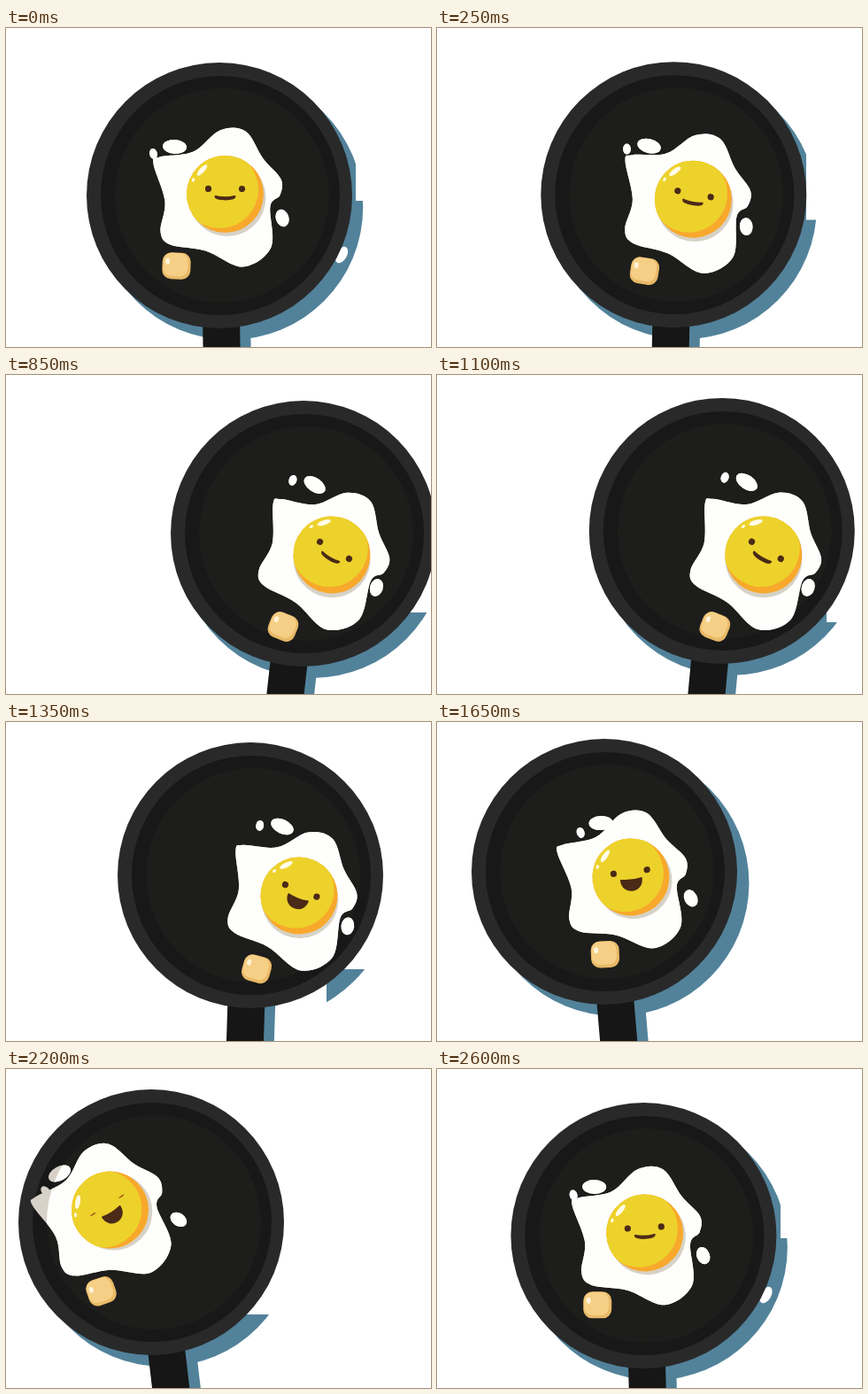
These frames come from a looping animation (480 px wide and 360 px high, 2650 ms). An HTML page with a canvas:

```html
<!DOCTYPE html>
<html>
<head>
<meta charset="utf-8">
<style>
html, body { margin: 0; width: 100%; height: 100%; overflow: hidden; background: #fff; }
canvas { display: block; }
</style>
</head>
<body>
<canvas id="stage" width="480" height="360"></canvas>
<script>
const ctx = document.getElementById('stage').getContext('2d');
const LOOP = 2650, STEP = 50;

// Only the pan and the yolk are keyed; everything else follows them
const keys = [
  { t: 0,    pan: [241, 189], yolk: [247.5, 187.5] },
  { t: 500,  pan: [291, 184], yolk: [321, 196] },
  { t: 850,  pan: [336, 179], yolk: [368, 203] },
  { t: 1350, pan: [276, 173], yolk: [331, 196] },
  { t: 1650, pan: [189, 169], yolk: [219, 175] },
  { t: 1950, pan: [150, 169], yolk: [127, 161] },
  { t: 2200, pan: [164, 173], yolk: [117.5, 159] }
];

// Two shoulders and a valley for each of the five lobes
const eggOutline = [
  [-81, -34], [-74, -42], [-36, -48],
  [-6, -72], [23, -71], [43, -40],
  [63, -17], [62, 1], [51, 14],
  [52, 60], [20, 82], [-22, 64],
  [-62, 57], [-73, 42], [-68, 8]
];

const rad = deg => deg * Math.PI / 180;
const cyclic = (list, i) => list[(i + list.length) % list.length];

function ramp(t, from, to) {
  const u = Math.max(0, Math.min(1, (t - from) / (to - from)));
  return u * u * (3 - 2 * u);
}
const pulse = (t, rise, top, fall, end) => ramp(t, rise, top) * (1 - ramp(t, fall, end));

// Periodic cubic interpolation through the keys
function sample(part, axis, t) {
  const value = i => cyclic(keys, i)[part][axis];
  const gap = i => (cyclic(keys, i + 1).t - cyclic(keys, i).t + LOOP) % LOOP;
  const rate = i => (value(i + 1) - value(i)) / gap(i);
  const slope = i => (rate(i - 1) * gap(i) + rate(i) * gap(i - 1)) / (gap(i - 1) + gap(i));
  const i = keys.findLastIndex(k => k.t <= t);
  const h = gap(i), u = (t - keys[i].t) / h, v = 1 - u;
  return v * v * (1 + 2 * u) * value(i) + u * u * (3 - 2 * u) * value(i + 1)
    + h * u * v * (v * slope(i) - u * slope(i + 1));
}

function poseAt(t) {
  const [px, py, x, y] = ['pan', 'yolk'].flatMap(part => [0, 1].map(axis => sample(part, axis, t)));
  const face = (x - 247) / 4;
  const beadAngle = rad(22.6 + 0.45 * face), beadReach = 70 - 0.25 * face;
  const butterLag = 45 * pulse(t, 1100, 2100, 2200, LOOP);
  return {
    pan: { x: px, y: py, tilt: (px - 252) / 13 },
    yolk: { x, y }, face,
    drop: { x: x - 57 + 38 * pulse(t, 0, 900, 1350, 2050), y: py - 55 },
    bead: { x: x + beadReach * Math.cos(beadAngle), y: y + beadReach * Math.sin(beadAngle) },
    butter: { x: x - 55 + butterLag, y: y + 81 + 0.24 * butterLag }
  };
}

function at({ x, y }, deg, draw) {
  ctx.save();
  ctx.translate(x, y);
  ctx.rotate(rad(deg));
  draw();
  ctx.restore();
}

function ellipse(x, y, rx, ry, color, deg = 0) {
  ctx.beginPath();
  ctx.ellipse(x, y, rx, ry, rad(deg), 0, 7);
  ctx.fillStyle = color;
  ctx.fill();
}
const disc = (x, y, r, color) => ellipse(x, y, r, r, color);

function box(x, y, w, h, r, color) {
  ctx.beginPath();
  ctx.roundRect(x, y, w, h, r);
  ctx.fillStyle = color;
  ctx.fill();
}

function smoothShape(points, color) {
  ctx.beginPath();
  ctx.moveTo(...points[0]);
  points.forEach(([ax, ay], i) => {
    const [px, py] = cyclic(points, i - 1), [bx, by] = cyclic(points, i + 1), [nx, ny] = cyclic(points, i + 2);
    ctx.bezierCurveTo(ax + (bx - px) / 6, ay + (by - py) / 6, bx - (nx - ax) / 6, by - (ny - ay) / 6, bx, by);
  });
  ctx.fillStyle = color;
  ctx.fill();
}

function clipped(addRegion, draw) {
  ctx.save();
  ctx.beginPath();
  addRegion();
  ctx.clip();
  draw();
  ctx.restore();
}

const drawHandle = (place, tilt, color) => at(place, tilt, () => box(-21, 120, 42, 200, 0, color));

// Parts of the shadow are hidden above a ledge that slides with the pan
function shadowRegion(t) {
  if (t >= 1500 && t < 1950) return ctx.rect(0, 0, 480, 360);
  if (t >= 1200 && t < 1500) return ctx.rect(362, 279, 118, 81);
  const back = Math.max(0, t - 2200);
  const ledge = t < 1200 ? Math.min(279, 195 + t * 0.086) : 277 - back * 0.215;
  const side = t < 1200 ? Math.min(440, 395 + t * 0.088) : 270 + back * 0.295;
  ctx.rect(0, ledge, 480, 360);
  ctx.rect(0, 0, side, ledge);
}

function drawShadow({ x, y, tilt }, t) {
  const blue = '#52829a', place = { x: x + 12 - tilt * 0.3, y: y + 13 };
  clipped(() => shadowRegion(t), () => disc(place.x, place.y, 150, blue));
  drawHandle(place, tilt, blue);
  if (t < 250 || t > 2400) ellipse(x + 138, y + 67, 6, 10, '#fff', 30);
}

function drawPan(pan) {
  drawHandle(pan, pan.tilt, '#161616');
  disc(pan.x, pan.y, 150, '#29292a');
  disc(pan.x + 1, pan.y, 135, '#181818');
  disc(pan.x + 3, pan.y, 121, '#1d1d1c');
}

function drawWhite({ yolk, drop, bead, face }, color) {
  at(yolk, face * 0.6, () => smoothShape(eggOutline, color));
  at(drop, face, () => {
    ellipse(0, 0, 13.5, 8, color, 4);
    ellipse(-24, 8, 4.4, 6, color, -12);
  });
  ellipse(bead.x, bead.y, 7.3, 10, color, face * 1.2 - 18);
}

function drawButter({ butter, face }) {
  at(butter, face * 0.65 + 2, () => {
    box(-16, -15, 32, 30, 10, '#e8b967');
    box(-15, -14.5, 28, 26, 9, '#f6cf86');
    ellipse(-10, -5, 2.5, 3.5, '#fff3d8');
  });
}

function drawMouth(open, ink) {
  const w = 11 + open * 0.5, top = 2.5, bottom = top + 4.5 + 12 * open;
  ctx.beginPath();
  ctx.moveTo(-w, top);
  ctx.quadraticCurveTo(0, top + 2.5, w, top);
  ctx.bezierCurveTo(w, bottom, -w, bottom, -w, top);
  ctx.closePath();
  ctx.fillStyle = ctx.strokeStyle = ink;
  ctx.lineWidth = 2;
  ctx.lineJoin = 'round';
  ctx.fill();
  ctx.stroke();
}

function drawYolk({ yolk, face }, t) {
  const open = pulse(t, 1050, 1400, 2250, 2500);
  const blink = pulse(t, 2000, 2150, 2250, 2400);
  const ink = '#4b2a17', shine = '#fffbe8';
  at(yolk, face, () => {
    disc(2.5, 4, 43.5, '#d6d2c6');
    disc(0, 0, 43.5, '#f8a82b');
    clipped(() => ctx.arc(0, 0, 43.5, 0, 7), () => disc(-6, -5, 43.5, '#edd22b'));
    ellipse(-26, -27, 8, 2.8, shine, -48);
    ellipse(-36, -16, 1.6, 2.4, shine, 25);
    for (const x of [-19, 19]) ellipse(x, -6, 3.6, 3.6 - 2.7 * blink, blink > 0.6 ? '#a8641c' : ink);
    drawMouth(open, ink);
  });
}

function render(now) {
  const t = Math.floor(now % LOOP / STEP) * STEP;
  const pose = poseAt(t), { pan } = pose;
  ctx.fillStyle = '#fff';
  ctx.fillRect(0, 0, 480, 360);
  drawShadow(pan, t);
  drawPan(pan);

  // The white turns grey where it climbs the wall
  drawWhite(pose, '#d8d1c8');
  clipped(() => ctx.arc(pan.x + 8, pan.y, 126, 0, 7), () => drawWhite(pose, '#fefefd'));

  drawButter(pose);
  drawYolk(pose, t);
}

const start = performance.now();
function tick() {
  render(performance.now() - start);
  requestAnimationFrame(tick);
}
tick();
</script>
</body>
</html>
```
